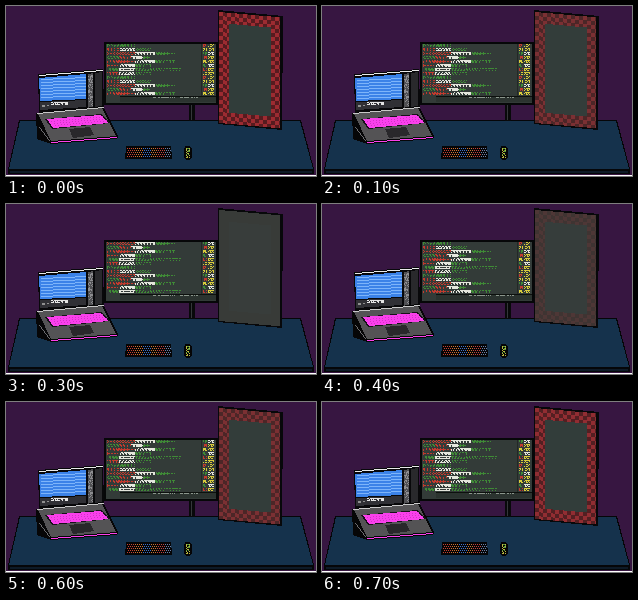
An HTML page with a canvas for the animation above (800 ms loop, 310 by 170 pixels).

```html
<!DOCTYPE html>
<html lang="en">
<head>
<meta charset="utf-8">
<title>Desk setup</title>
<style>
html, body { margin: 0; width: 100%; height: 100%; overflow: hidden; background: #371641; }
canvas { display: block; width: 310px; height: 170px; image-rendering: pixelated; }
</style>
</head>
<body>
<canvas id="stage" width="310" height="170"></canvas>
<script>
const ctx = document.getElementById('stage').getContext('2d');
const STEP = 100, STEPS = 8;
const INK = { r: '#c23a2e', w: '#e4e6dc', g: '#3f8a36', y: '#d8cc3c' };
// Each letter of a line is a four pixel run of that ink.
const CODE = [
  'ggggggg', 'rrrwwwwgggg',
  'rrrrrrrwwwwwggggg', 'gggrrrwwwgg',
  'rrrrrrrwwwwwggggg', 'rrrwwwwgggg',
  'gggwwwwgggggggggggg', 'rrrwwwwgggg'
];

function rect(x, y, w, h, color) {
  ctx.fillStyle = color;
  ctx.fillRect(x, y, w, h);
}

// Fill row by row so that the edges stay pixel sharp.
function poly(color, ...pts) {
  const ys = pts.map(p => p[1]);
  for (let y = Math.floor(Math.min(...ys)); y < Math.max(...ys); y++) {
    const xs = [], m = y + 0.5;
    pts.forEach((a, i) => {
      const b = pts[(i + 1) % pts.length];
      if ((a[1] <= m) !== (b[1] <= m))
        xs.push(a[0] + (m - a[1]) * (b[0] - a[0]) / (b[1] - a[1]));
    });
    xs.sort((a, b) => a - b);
    for (let i = 0; i + 1 < xs.length; i += 2) {
      const x = Math.round(xs[i]);
      rect(x, y, Math.round(xs[i + 1]) - x, 1, color);
    }
  }
}

function line(x0, y0, x1, y1, color) {
  const n = Math.max(Math.abs(x1 - x0), Math.abs(y1 - y0));
  for (let i = 0; i <= n; i++)
    rect(Math.round(x0 + (x1 - x0) * i / n), Math.round(y0 + (y1 - y0) * i / n), 1, 1, color);
}

function hash(a, b) {
  const v = Math.sin(a * 12.99 + b * 78.23) * 43758.55;
  return v - Math.floor(v);
}

function mix(a, b, t) {
  return `rgb(${a.map((v, i) => Math.round(v + (b[i] - v) * t)).join()})`;
}

// Tiny unreadable lettering.
function scribble(x, y, w, h, color, seed, fill = 0.5) {
  for (let i = 0; i < w; i++)
    for (let j = 0; j < h; j++)
      if (hash(i + seed, j + 3) < fill) rect(x + i, y + j, 1, 1, color);
}

function desk() {
  poly('#050608', [13, 114], [295, 114], [308, 163], [308, 168], [2, 168], [2, 163]);
  poly('#15324c', [14, 115], [294, 115], [307, 163], [3, 163]);
  rect(4, 165, 302, 2, '#0d1a27');
}

function monitor(page) {
  rect(183, 97, 6, 18, '#08090a');
  rect(185, 99, 1, 15, '#34363a');
  rect(98, 36, 114, 63, '#060708');
  rect(100, 38, 110, 59, '#333b38');
  for (let row = 0; row < 13; row++) {
    const n = (row + page * 2) % CODE.length, y = 38 + row * 4;
    [...CODE[n]].forEach((ink, i) =>
      scribble(101 + i * 4, y, 4, 3, INK[ink], n * 5 + i, ink === 'w' ? 0.6 : 0.42));
    scribble(197, y, 4, 3, INK['ryg'[n % 3]], n, 0.5);
    scribble(202, y, 6, 3, INK['yyw'[n % 3]], n + 7, 0.5);
  }
  rect(195, 38, 1, 52, '#232925');
  rect(114, 90, 96, 1, '#0c100d');
  rect(114, 91, 96, 5, '#2b332f');
  scribble(146, 91, 46, 1, '#8b968c', 3);
}

function laptop(shift) {
  poly('#08080a', [32, 68], [97, 63], [98, 103], [33, 108]);
  line(33, 69, 96, 64, '#e9e9e9');
  poly('#3b82e8', [33, 72], [80, 68], [80, 93], [34, 95]);
  for (let y = 73 + shift; y < 93; y += 3) line(35, y, 79, y - 2, '#7db4fa');
  poly('#505053', [82, 68], [87, 67], [87, 101], [82, 102]);
  scribble(82, 69, 5, 31, '#8d8d90', 2, 0.4);
  poly('#29292c', [89, 67], [96, 66], [96, 101], [89, 102]);
  poly('#303035', [34, 96], [80, 94], [80, 101], [34, 104]);
  scribble(45, 96, 17, 3, '#e4e4e4', 9, 0.6);
  scribble(36, 99, 7, 2, '#909090', 4);

  poly('#060607', [30, 107], [97, 100], [112, 130], [111, 133], [45, 138], [31, 133]);
  poly('#545355', [32, 108], [96, 102], [110, 130], [45, 135]);
  line(31, 107, 97, 101, '#c8c8c8');
  line(33, 121, 43, 134, '#6d6d70');
  poly('#171019', [39, 113], [96, 108], [104, 117], [46, 123]);
  poly('#fa40ec', [41, 113], [95, 109], [102, 117], [47, 122]);
  for (let row = 0; row < 3; row++)
    for (let i = row % 2; i < 52; i += 3)
      rect(45 + row * 2 + i, Math.round(115 + row * 2 - i * 0.09), 1, 1, '#d233c6');
  poly('#29282b', [63, 123], [84, 121], [88, 129], [67, 132]);
  line(45, 136, 110, 131, '#fa40ec');
}

function panel(glow) {
  const base = [56, 59, 56];
  const light = mix(base, [156, 43, 49], glow), dark = mix(base, [86, 27, 31], glow);
  const inner = mix([56, 61, 59], [49, 61, 58], glow);
  poly('#07080a', [212, 4], [277, 10], [276, 124], [212, 118]);
  for (let x = 0; x < 61; x++) {
    const top = Math.round(6 + x * 0.088);
    for (let y = 0; y < 111; y++) {
      const edge = x < 10 || x > 51 || y < 11 || y > 99;
      const odd = (Math.floor(x / 4) + Math.floor(y / 4)) % 2;
      rect(213 + x, top + y, 1, 1, edge ? (odd ? dark : light) : inner);
    }
  }
}

function desktopTools() {
  const keys = ['#c8402f', '#d0702f', '#3f72c8', '#c87431', '#c3423b', '#6c7fa8'];
  poly('#050506', [120, 140], [165, 140], [166, 153], [119, 153]);
  for (let row = 0; row < 5; row++)
    for (let col = 0; col < 22; col++)
      rect(121 + col * 2 + row % 2, 142 + row * 2, 1, 1, keys[Math.floor(col / 3.7)]);
  poly('#050506', [179, 140], [184, 140], [186, 143], [186, 151], [184, 154], [180, 154], [178, 151], [178, 143]);
  scribble(180, 142, 4, 10, '#b9b83d', 6, 0.4);
  scribble(180, 142, 4, 10, '#5b9b3d', 31, 0.2);
}

function draw(step) {
  rect(0, 0, 310, 170, '#371641');
  desk();
  monitor(Math.floor(step / 2) % 2);
  laptop(Math.min(step, 6) % 2);
  panel(step < 3 ? 1 - step / 3 : (step - 3) / 4.5);
  desktopTools();
  rect(0, 169, 310, 1, '#fff');
}

let last = -1;
function tick() {
  const step = Math.floor(performance.now() / STEP) % STEPS;
  if (step !== last) draw(last = step);
  requestAnimationFrame(tick);
}
tick();
</script>
</body>
</html>
```
